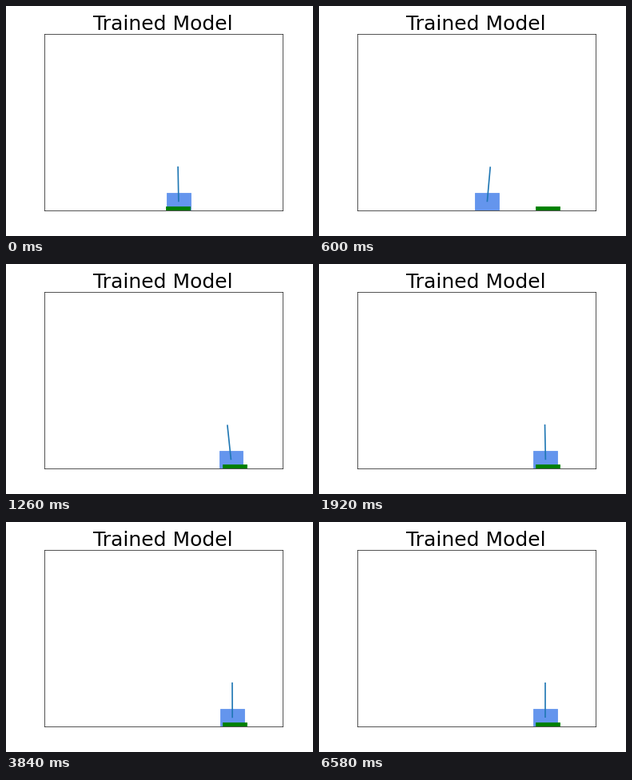
Animation of 384 by 288 pixels, one loop 8000 ms. Source, as a matplotlib script:

```python
import math

import matplotlib.pyplot as plt
from matplotlib.animation import FuncAnimation
from matplotlib.patches import Rectangle

WIDTH, HEIGHT, DPI = 384, 288, 60
LOOP_MS, INTERVAL, STEP_MS = 8000, 20, 30

LEFT, RIGHT, BOTTOM, TOP = 0.125, 0.9, 0.11, 0.88
UNIT_X = (RIGHT - LEFT) * WIDTH / 10     # the world is 10 wide and 5 high
UNIT_Y = (TOP - BOTTOM) * HEIGHT / 5
GROUND = (1 - BOTTOM) * HEIGHT
PIVOT = GROUND - UNIT_Y / 4
GOAL_START, GOAL_END = 215, 286

# Turning points (ms, pixels): back off to tip the pole, run, overshoot, settle
CART = [(0, 215.9), (270, 192.3), (1405, 285.15), (2050, 283.15)]
LEAN = [(0, -0.8), (250, 6.6), (1330, -4.7), (2100, -0.25), (6580, 0)]


def swing(points, t):
    """Cosine easing from one turning point to the next, then rest."""
    for (t0, a), (t1, b) in zip(points, points[1:]):
        if t < t1:
            return a + (b - a) * (1 - math.cos(math.pi * (t - t0) / (t1 - t0))) / 2
    return points[-1][1]


def block(height, color, zorder):
    """One unit wide box standing on the ground."""
    return ax.add_patch(Rectangle((0, GROUND - height), UNIT_X, height,
                                  color=color, zorder=zorder))


fig, ax = plt.subplots(figsize=(WIDTH / DPI, HEIGHT / DPI), dpi=DPI)
fig.subplots_adjust(left=LEFT, right=RIGHT, bottom=BOTTOM, top=TOP)
ax.set(xlim=(LEFT * WIDTH, RIGHT * WIDTH), ylim=(GROUND, (1 - TOP) * HEIGHT),
       xticks=[], yticks=[])
ax.set_title("Trained Model", fontsize=30, fontname="DejaVu Sans")

cart = block(UNIT_Y / 2, "cornflowerblue", 1)
pole, = ax.plot([], [], color="tab:blue", lw=2, solid_capstyle="butt")
goal = block(UNIT_Y / 8, "green", 2.2)


def draw(i):
    t = (i + 0.5) * INTERVAL // STEP_MS * STEP_MS
    x, lean = swing(CART, t), swing(LEAN, t)

    cart.set_x(x - UNIT_X / 2)
    goal.set_x((GOAL_START if t < STEP_MS else GOAL_END) - UNIT_X / 2)
    tip = PIVOT - UNIT_Y * math.sqrt(1 - (lean / UNIT_X) ** 2)
    pole.set_data([x, x + lean], [PIVOT, tip])
    return cart, pole, goal


anim = FuncAnimation(fig, draw, frames=LOOP_MS // INTERVAL, interval=INTERVAL,
                     repeat=True, repeat_delay=0)
plt.show()
```
